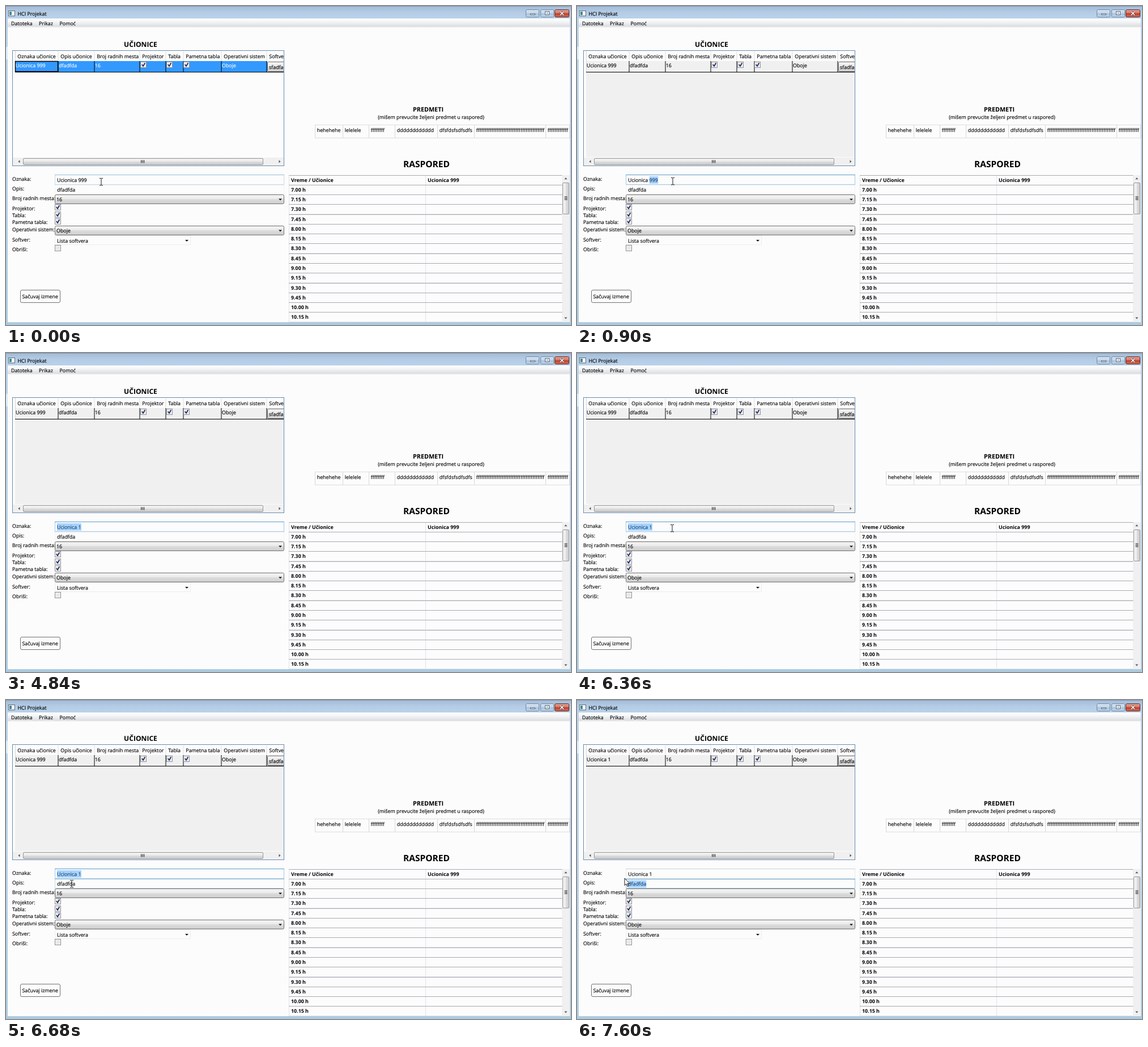
Animation of 997x562 px, one loop 8 s. Source, as an HTML page:

```html
<!DOCTYPE html>
<html lang="sr">
<head>
<meta charset="utf-8">
<title>HCI Projekat</title>
<style>
  html, body { margin: 0; width: 100%; height: 100%; overflow: hidden; background: #fcfcfc; }
  svg { display: block; width: 997px; height: 562px; }
  text {
    font: 8.9px "Open Sans", "Noto Sans", sans-serif;
    font-variant-ligatures: none;
    text-rendering: geometricPrecision;
    white-space: pre;
    color: #000;
    fill: currentColor;
    stroke: currentColor;
    stroke-width: .15px;
  }
  .b { font-weight: 700; stroke: none; }
</style>
</head>
<body>
<svg id="stage" viewBox="0 0 997 562" xmlns="http://www.w3.org/2000/svg"></svg>
<script>
const LOOP = 8000;
const PAPER = '#fcfcfc';
const stage = document.getElementById('stage');
const $ = id => document.getElementById(id);

// --- drawing helpers, each returns markup ---
const rect = (x, y, w, h, fill, extra = '') =>
  `<rect x="${x}" y="${y}" width="${w}" height="${h}" fill="${fill}" ${extra}/>`;
const box = (x, y, w, h, fill, stroke, r = 0, extra = '') =>
  rect(x + .5, y + .5, w - 1, h - 1, fill, `stroke="${stroke}" rx="${r}" ${extra}`);
const text = (x, y, s, extra = '') => `<text x="${x}" y="${y}" ${extra}>${s}</text>`;
const title = (x, y, s, size) =>
  text(x, y, s, `class="b" text-anchor="middle" style="font-size:${size}px"`);
const path = (d, fill, extra = '') => `<path d="${d}" fill="${fill}" ${extra}/>`;
const group = (id, s) => `<g id="${id}">${s}</g>`;
const down = (x, y, r = 3) => path(`M${x - r} ${y - r / 2}h${2 * r}l${-r} ${r}z`, '#111');
const gradient = (id, stops, across) =>
  `<linearGradient id="${id}" x2="${across ? 1 : 0}" y2="${across ? 0 : 1}">` +
  stops.map(([o, c]) => `<stop offset="${o}" stop-color="${c}"/>`).join('') + '</linearGradient>';

const check = (x, y, on = true) =>
  box(x, y, 11, 11, '#f4f4f4', '#8e8f8f') +
  rect(x + 2, y + 2, 7, 7, '#e6e8ec') +
  (on ? path(`M${x + 2.8} ${y + 5}l2.2 3 3.4-5.8`, 'none', 'stroke="#1c2a66" stroke-width="1.7"') : '');

const combo = (y, label, fill, edge) =>
  box(86, y, 405, 17, `url(#${fill})`, edge, 2) + text(89, y + 12.4, label) + down(484, y + 9);

const cell = (x, y, w, label = '') =>
  rect(x + .5, y + .5, w, 17, PAPER, 'stroke="#e2e3ea"') +
  rect(x, y, w + 1, 1, '#a9abb0') +
  (label && text(x + 4, y + 12.2, label, 'class="b"'));

const field = (id, y, h) =>
  rect(86.5, y + .5, 404, h - 1, PAPER, `id="${id}Box"`) +
  rect(86, y, 405, 1, '#ccc', `id="${id}Top"`);

function frame() {
  return rect(0, 0, 997, 562, 'url(#aero)') +
    rect(0, 0, 997, 1, '#7f97b0') +
    rect(0, 72, 3, 22, '#d9edf8') +
    rect(3, 22, 992, 535, PAPER) +
    rect(3, 22, 992, 15.5, 'url(#menu)') +
    box(4, 8, 12, 10, '#f8fafc', '#5c6b7c') + rect(6, 10, 4, 6, '#3c8c96') +
    text(20.5, 16.5, 'HCI Projekat') +
    box(917, 6, 24, 14, 'url(#cap)', '#6f88a3', 2) +
    box(943, 6, 24, 14, 'url(#cap)', '#6f88a3', 2) +
    box(968, 6, 26, 14, 'url(#close)', '#5b2a2c', 2) +
    box(925, 13, 9, 3, '#fff', '#56687c') +
    box(951, 9, 8, 7, '#fff', '#56687c') + rect(953.5, 11.5, 3, 2, '#7f93a8') +
    path('M978 10l6 6m0-6l-6 6', 'none', 'stroke="#5a3034" stroke-width="3"') +
    path('M978 10l6 6m0-6l-6 6', 'none', 'stroke="#fff" stroke-width="1.7"') +
    text(9, 33.5, 'Datoteka') + text(58, 33.5, 'Prikaz') + text(94.5, 33.5, 'Pomoć');
}

function grid() {
  const cols = [92, 156, 236, 282, 313, 380, 460];
  const heads = ['Oznaka učionice', 'Opis učionice', 'Broj radnih mesta', 'Projektor',
    'Tabla', 'Pametna tabla', 'Operativni sistem', 'Softver'];
  let s = title(237.5, 72, 'UČIONICE', 12.1) + box(11, 78, 480, 204, PAPER, '#688caf') +
    rect(16, 97, 474, 169, '#f0f0f0', 'id="idle"') +
    rect(16, 79, 1, 38, '#d5d5d5') +
    rect(16, 97, 445, 19, '#3399ff', 'id="rowFill"');
  s += '<g clip-path="url(#gridClip)">';
  heads.forEach((h, i) => s += text((i ? cols[i - 1] : 16) + 4.3, 92, h));
  cols.forEach(x => s += rect(x - .5, 80, 1, 16, '#dedede') + rect(x - .5, 97, 1, 19, '#000'));
  s += rect(16, 116, 474, 1, '#000') +
    box(461, 98, 40, 18, 'url(#btn)', '#707070', 2) + text(464, 111, 'sfadfada') + '</g>';
  s += box(16, 97, 76, 19, 'none', '#000', 0, 'id="rowFocus" stroke-width="1.4"') +
    group('rowText', text(17, 108, '', 'id="rowName"') + text(93, 108, 'dfadfda') +
      text(156.8, 108, '16') + text(381, 108, 'Oboje')) +
    [237, 283, 313].map(x => check(x, 98)).join('');
  // horizontal scroll bar
  s += rect(12, 267, 478, 14, '#f0f0f0') + box(30, 268, 424, 12, 'url(#btn)', '#979797', 1.5) +
    [238.5, 241, 243.5].map(x => rect(x - .5, 271.5, 1.2, 5, '#333')).join('') +
    path('M24.5 271.5v5l-3-2.5z', '#555') + path('M481.5 271.5v5l3-2.5z', '#555');
  return s;
}

function form() {
  const labels = [['Oznaka:', 307.5], ['Opis:', 325], ['Broj radnih mesta:', 342.3],
    ['Projektor:', 359.5], ['Tabla:', 372], ['Pametna tabla:', 384.3],
    ['Operativni sistem:', 397], ['Softver:', 414.5], ['Obriši:', 431.5]];
  return labels.map(([s, y]) => text(11, y, s)).join('') +
    field('name', 297, 18) + field('desc', 315, 17) +
    text(90, 310, '', 'id="nameText"') + text(90, 327.3, 'dfadfda') +
    rect(0, 300, 0, 13, '#3399ff', 'id="nameSel" opacity=".42"') +
    rect(0, 317.5, 0, 13, '#3399ff', 'id="descSel" opacity=".42"') +
    rect(132, 300, 1, 13, '#000', 'id="caret"') +
    combo(332, '16', 'btn', '#707070') +
    group('hot', combo(332, '16', 'hover', '#3c7fb1')) +
    [349, 362, 374].map(y => check(86, y)).join('') +
    combo(387, 'Oboje', 'btn', '#707070') +
    rect(86.5, 404.5, 239, 16, PAPER, 'stroke="#ededf0"') +
    text(90, 416.5, 'Lista softvera') + down(319, 413.5) +
    check(86, 421, false) +
    box(25, 500, 71, 23, PAPER, '#707070', 2.5) + text(28.5, 515.3, 'Sačuvaj izmene');
}

function subjects() {
  const items = [[545, 'hehehehe'], [594, 'lelelele'], [640, 'f'.repeat(8)], [686, 'd'.repeat(12)],
    [761, 'dfsfdsfsdfsdfs'], [826, 'f'.repeat(40)], [952, 'f'.repeat(12)]];
  return title(745, 186, 'PREDMETI', 10.8) +
    text(750, 198.5, '(mišem prevucite željeni predmet u raspored)', 'text-anchor="middle"') +
    rect(545.5, 209.5, 449, 23, PAPER, 'stroke="#dedede"') +
    items.map(([x, s]) => rect(x, 210, 1, 22, '#d8d8d8') + text(x + 3.7, 222, s)).join('');
}

function schedule() {
  let s = title(742, 283.5, 'RASPORED', 15.5) + '<g clip-path="url(#tableClip)">';
  for (let i = 0; i < 15; i++) {
    const y = Math.round(297.6 + i * 17.27), m = 405 + i * 15;
    const time = `${Math.floor(m / 60)}.${String(m % 60).padStart(2, '0')} h`;
    s += cell(499, y, 241, i ? time : 'Vreme / Učionice') +
      cell(740, y, 241, i ? '' : 'Ucionica 999');
  }
  return s + '</g>' + rect(982, 298, 12.5, 259, '#f0f0f0') +
    box(982, 311, 12, 56, 'url(#btnV)', '#979797', 1.5) +
    [336, 338.5, 341].map(y => rect(985.5, y - .5, 5, 1.2, '#333')).join('') +
    path('M985.3 305.3h5l-2.5-3z', '#555') + path('M985.3 548.5h5l-2.5 3z', '#555');
}

const cursors =
  group('beam', path('M-3-6.5h2.2l.8.8.8-.8H3M0-5.7V5.2M-3 6h2.2l.8-.8.8.8H3', 'none',
    'stroke="#000" stroke-width=".9"')) +
  group('arrow', path('M0 0V12.6l2.9-2.7 2 4.6 2-.9-2-4.3h4.1z', '#fff',
    'stroke="#000" stroke-width=".9"'));

const greys = [[0, '#f3f3f3'], [.5, '#ebebeb'], [.5, '#dddddd'], [1, '#cdcdcd']];
stage.innerHTML = '<defs>' +
  gradient('aero', [[0, '#a3bbd5'], [.02, '#b4cce5'], [.04, '#bad2ea'], [.5, '#b9d1ea'], [1, '#accbe0']]) +
  gradient('menu', [[0, '#ffffff'], [.4, '#f3f4f6'], [.9, '#dcdee1'], [1, '#e9eaec']]) +
  gradient('cap', [[0, '#d5e3f1'], [.5, '#c3d5e8'], [.5, '#a9c1da'], [1, '#bfd5ea']]) +
  gradient('close', [[0, '#e5a497'], [.5, '#d0705f'], [.5, '#b93a26'], [1, '#d3735a']]) +
  gradient('btn', greys) + gradient('btnV', greys, true) +
  gradient('hover', [[0, '#eaf6fd'], [.5, '#d9f0fc'], [.5, '#bee6fd'], [1, '#a7d9f5']]) +
  '<clipPath id="gridClip"><path d="M12 79h478v202H12z"/></clipPath>' +
  '<clipPath id="tableClip"><path d="M499 297h482.5v260H499z"/></clipPath></defs>' +
  frame() + grid() + form() + subjects() + schedule() + cursors;

// --- timeline: [time, x, y, shape]; no shape hides the pointer ---
const pointer = [
  [0, 168, 310, 'beam'], [50, 169, 309, 'beam'], [3200, 0, 0, ''],
  [6360, 168, 309, 'beam'], [6390, 139, 324, 'beam'], [6450, 107, 341, 'arrow'],
  [6510, 106, 341, 'arrow'], [6560, 107, 338, 'arrow'], [6600, 109, 334, 'arrow'],
  [6640, 113, 328, 'beam'], [6680, 116, 324, 'beam'], [6710, 120, 324, 'beam'],
  [6800, 124, 324, 'beam'], [6890, 125, 324, 'beam'], [7230, 119, 324, 'beam'],
  [7290, 110, 324, 'beam'], [7350, 100, 323, 'beam'], [7410, 92, 322, 'beam'],
  [7470, 86, 320, 'arrow'], [7530, 84, 317, 'arrow'], [7600, 84, 314, 'arrow']
];
// focus and text states, keyed by start time
const states = [
  [0, { focus: '', name: 'Ucionica 999' }],
  [770, { focus: 'name', caret: 143 }],
  [900, { sel: [127.8, 143.3], caret: 0 }],
  [3260, { name: 'Ucionica 1', sel: 0, caret: 132 }],
  [3730, { caret: 0 }], [4250, { caret: 132 }], [4720, { caret: 0 }],
  [4840, { sel: [90, 133] }],
  [7170, { focus: 'desc', sel: 0 }]
];
const edges = {
  plain: ['#e9eaee', '#cfd1d6'], faint: ['#f3f3f5', '#eeeef1'],
  hover: ['#c5daed', '#93bfda'], focus: ['#a3cae6', '#5a9ccb']
};

const set = (id, attrs) => {
  for (const k in attrs) $(id).setAttribute(k, attrs[k]);
};
const show = (id, on) => set(id, { visibility: on ? 'visible' : 'hidden' });
const span = (id, r) => set(id, { x: r ? r[0] : 0, width: r ? r[1] - r[0] : 0 });
const edge = (id, kind) => {
  set(id + 'Box', { stroke: edges[kind][0] });
  set(id + 'Top', { fill: edges[kind][1] });
};

function render(t) {
  const [, x, y, shape] = pointer.findLast(p => p[0] <= t);
  const s = Object.assign({}, ...states.filter(p => p[0] <= t).map(p => p[1]));
  const over = (top, bottom) => shape && x > 86 && y >= top && y < bottom;

  for (const id of ['beam', 'arrow']) {
    show(id, id === shape);
    set(id, { transform: `translate(${x} ${y})` });
  }
  const selected = !s.focus;
  show('rowFill', selected);
  show('rowFocus', selected);
  show('idle', !selected);
  for (const el of $('rowText').children) el.style.color = selected ? '#fff' : '#000';
  $('rowName').textContent = s.focus === 'desc' ? s.name : 'Ucionica 999';
  $('nameText').textContent = s.name;
  span('nameSel', s.sel);
  span('descSel', s.focus === 'desc' && x < 122 ? [Math.max(90, x), 122.3] : 0);
  show('caret', s.caret);
  set('caret', { x: s.caret || 0 });
  edge('name', s.focus === 'name' ? 'focus' : over(297, 315) ? 'hover' : 'plain');
  edge('desc', s.focus === 'desc' ? 'focus' : over(315, 332) ? 'hover' : 'faint');
  show('hot', over(332, 349));
}

const start = performance.now();
function tick() {
  render((performance.now() - start) % LOOP);
  requestAnimationFrame(tick);
}
tick();
</script>
</body>
</html>
```
